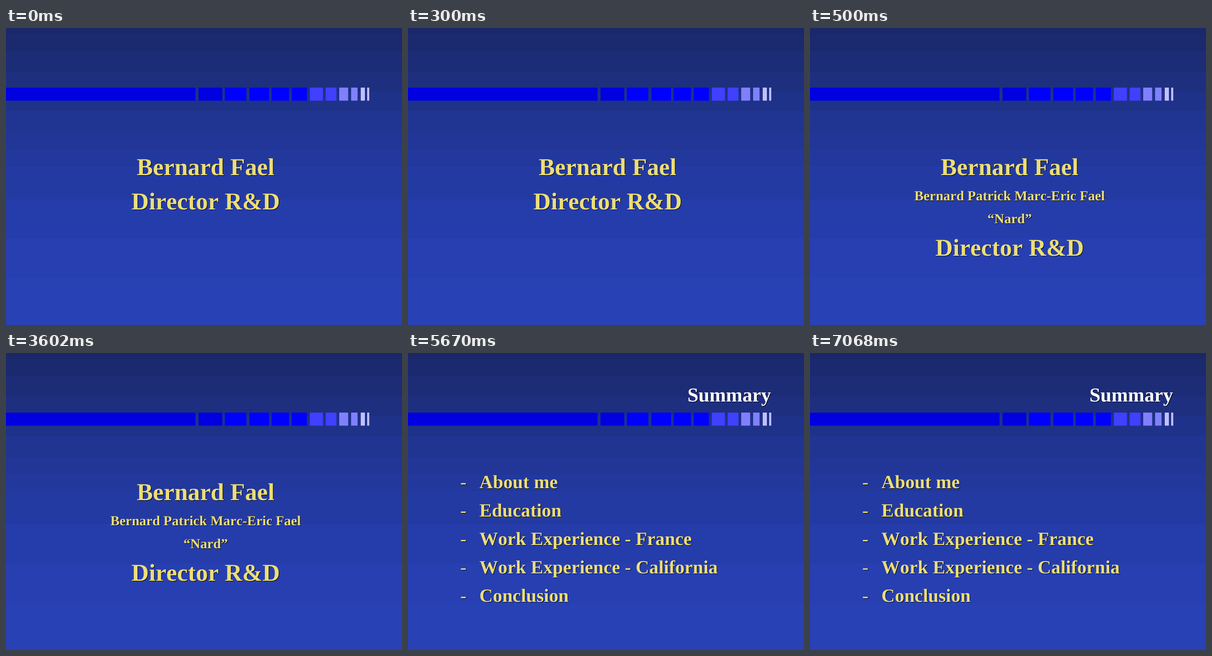
Write an HTML page that moves like this. It is 864 px wide and 648 px high and loops after 8000 ms.

```html
<!DOCTYPE html>
<html lang="en">
<head>
<meta charset="utf-8">
<title>Slides</title>
<style>
  html, body { margin: 0; width: 100%; height: 100%; overflow: hidden; background: #2841b5; }
  svg { display: block; width: 864px; height: 648px; }
  text {
    font: bold 40.8px "Liberation Serif", "Times New Roman", serif;
    font-kerning: none;
    text-rendering: geometricPrecision;
    fill: #ebde78;
  }
  .slide { filter: drop-shadow(1.5px 1.5px 0 #000); }
  .intro { text-anchor: middle; animation: intro 8s step-end infinite; }
  .intro text { font-size: 52.8px; }
  .intro .details text { font-size: 30px; }
  .details { animation: details 8s step-end infinite; }
  .role { animation: role 8s step-end infinite; }
  .summary { animation: summary 8s step-end infinite; }
  .summary .heading { font-size: 43.2px; fill: #fff; text-anchor: end; }
  .summary .dash { font-weight: normal; }

  @keyframes intro { 0% { opacity: 1; } 70.875%, 100% { opacity: 0; } }
  @keyframes details { 0% { opacity: 0; } 6.25%, 100% { opacity: 1; } }
  @keyframes role { 0% { transform: none; } 6.25%, 100% { transform: translateY(101px); } }
  @keyframes summary { 0% { opacity: 0; } 70.875%, 100% { opacity: 1; } }
</style>
</head>
<body>
<svg viewBox="0 0 864 648">
  <g id="backdrop"></g>
  <g id="bar"></g>

  <g class="slide intro">
    <text x="435.6" y="320.5">Bernard Fael</text>
    <g class="details">
      <text x="435.6" y="376">Bernard Patrick Marc-Eric Fael</text>
      <text x="435.6" y="426.3">“Nard”</text>
    </g>
    <text class="role" x="435.6" y="395.7">Director R&amp;D</text>
  </g>

  <g class="slide summary" id="summary">
    <text class="heading" x="792" y="106">Summary</text>
  </g>
</svg>
<script>
  const byId = id => document.getElementById(id);

  function add(parent, tag, attrs, content = "") {
    const node = document.createElementNS("http://www.w3.org/2000/svg", tag);
    for (const key in attrs) node.setAttribute(key, attrs[key]);
    node.textContent = content;
    parent.append(node);
  }

  // Each band runs from its top edge to the bottom of the stage.
  const bands = [
    [0, "#1a286a"], [13, "#1b2a6f"], [50, "#1c2c76"], [95, "#1e2f80"],
    [138, "#1f3289"], [181, "#203491"], [229, "#223698"], [265, "#22389c"],
    [302, "#243aa3"], [374, "#253cab"], [459, "#273fb1"], [545, "#2841b5"]
  ];
  for (const [y, fill] of bands)
    add(byId("backdrop"), "rect", { y, width: 864, height: 648 - y, fill });

  const blocks = [
    [0, 413.5, "#0000e0"], [420, 472, "#0000e0"],
    [477.5, 524.5, "#00f"], [531, 574, "#00f"], [579.5, 617.5, "#00f"], [623.5, 656.5, "#00f"],
    [663, 691.5, "#4040ff"], [697.5, 721, "#4040ff"],
    [727, 746.5, "#8080ff"], [753, 767, "#8080ff"],
    [774, 783, "#c0c0ff"], [788, 792.5, "#c0c0ff"]
  ];
  for (const [x, end, fill] of blocks)
    add(byId("bar"), "rect", { x, y: 130, width: end - x, height: 28.5, fill });

  const topics = ["About me", "Education", "Work Experience - France",
    "Work Experience - California", "Conclusion"];
  topics.forEach((topic, i) => {
    const y = 294.5 + 62 * i;
    add(byId("summary"), "text", { class: "dash", x: 114, y }, "-");
    add(byId("summary"), "text", { x: 155.8, y }, topic);
  });
</script>
</body>
</html>
```
